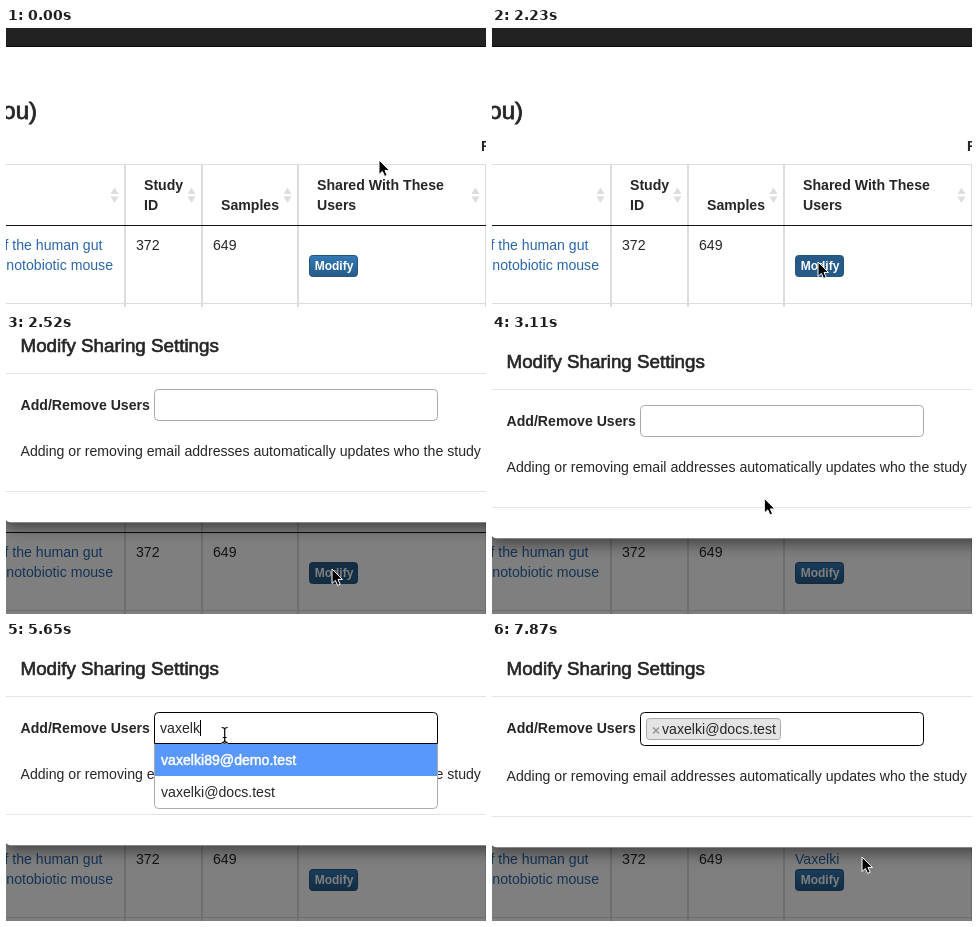
Write an HTML page that moves like this. It is 480 px wide and 279 px high and loops after 8 s.

```html
<!DOCTYPE html>
<html lang="en">
<head>
<meta charset="utf-8">
<title>Sharing settings</title>
<style>
  html, body { margin: 0; width: 100%; height: 100%; overflow: hidden; background: #fff; }
  svg { display: block; width: 100%; height: 100%; }
  text { font: 14.12px "Liberation Sans", Arial, sans-serif; fill: #262626; white-space: pre; }
  .bold { font-weight: bold; }
  .medium { stroke: #262626; stroke-width: .035em; }
  .link { fill: #2a67aa; }
  .end { text-anchor: end; }
  .hint { fill: #909090; }
  .rule { stroke: #ddd; fill: none; }
  .sheet { fill: #fff; stroke: rgba(0, 0, 0, .2); filter: drop-shadow(0 5px 7.5px rgba(0, 0, 0, .5)); }
  .picked { fill: #fff; stroke: #fff; stroke-width: .5px; }
</style>
</head>
<body>
<svg viewBox="0 0 480 279">
  <defs>
    <linearGradient id="blue" x2="0" y2="1">
      <stop stop-color="#337ab7"/><stop offset="1" stop-color="#265a88"/>
    </linearGradient>
  </defs>

  <rect width="480" height="279" fill="#fff"/>
  <rect width="480" height="18" fill="#222"/>
  <rect y="18" width="480" height="1" fill="#080808"/>
  <text class="medium end" x="31" y="91" style="font-size:24px">you)</text>
  <text class="bold" x="475" y="123">F</text>

  <path class="rule" d="M0 136.5H480M0 275.5H480"/>
  <path class="rule" stroke-width="2" d="M119 136V279M196 136V279M292 136V279M480 136V279"/>
  <path d="M0 197.5H480" stroke="#111"/>
  <path id="sorters" fill="#ddd"/>
  <text class="bold" x="138" y="162">Study</text>
  <text class="bold" x="138" y="182">ID</text>
  <text class="bold" x="215" y="182">Samples</text>
  <text class="bold" x="311" y="162">Shared With These</text>
  <text class="bold" x="311" y="182">Users</text>
  <text class="link end" x="96.5" y="222">f the human gut</text>
  <text class="link end" x="107" y="242">notobiotic mouse</text>
  <text x="130" y="222">372</text>
  <text x="207" y="222">649</text>
  <text class="link" id="sharedWith" x="303" y="222"></text>
  <rect id="button" x="303.5" y="227.5" width="48" height="21" rx="3" stroke="#245580"/>
  <text class="bold" x="328" y="242" text-anchor="middle" style="font-size:12px;fill:#fff">Modify</text>

  <rect id="backdrop" width="480" height="279"/>
  <g id="modal">
    <rect id="sheet" class="sheet" x="-1.5" y="-2.5" width="600" rx="6"/>
    <path d="M0 54.5H480" stroke="#e5e5e5"/>
    <text class="medium" x="14.5" y="32.5" style="font-size:18.8px">Modify Sharing Settings</text>
    <text class="bold" x="14.5" y="90.5">Add/Remove Users</text>
    <g id="lower">
      <text x="14.5" y="137">Adding or removing email addresses automatically updates who the study</text>
      <path d="M0 172.5H480" stroke="#e5e5e5"/>
    </g>
    <g id="dropdown">
      <path id="list" fill="#fff" stroke="#aaa"/>
      <path id="highlight" fill="#5897fb"/>
      <text id="row0" x="155" y="123"></text>
      <text id="row1" x="155" y="155"></text>
    </g>
    <path id="field" fill="#fff"/>
    <text id="typed" x="154" y="91"></text>
    <g id="token">
      <rect x="154.5" y="76.5" width="134" height="21" rx="3" fill="#e4e4e4" stroke="#aaa"/>
      <path d="M161 85.5l6 6m0-6l-6 6" stroke="#999" stroke-width="1.7"/>
      <text id="tokenText" x="170" y="91.5"></text>
    </g>
    <rect id="caret" y="78" width="1" height="16"/>
  </g>

  <g id="cursor">
    <path id="arrow" d="M0 0V14.5L3.4 11.4 5.6 16.4 8.2 15.3 6 10.4H10.5Z" stroke="#fff"/>
    <path id="hand" fill="#fff" stroke="#000" stroke-width="1.1" stroke-linejoin="round"
      d="M-1.3 9V.8Q0-1.2 1.4.8V5.2Q3-.0 4 5.6 5.6 4 6.4 6.4 8.6 5.4 8.7 8V11.5L7 16H-.8L-4.6 10.5Q-5 7.6-1.3 10ZM1.4 9.5V13M3.8 9.5V13M6 9.5V13"/>
    <g id="beam" fill="none">
      <path d="M-3-7.5Q0-7.5 0-5.5 0-7.5 3-7.5M0-5.5V5.5M-3 7.5Q0 7.5 0 5.5 0 7.5 3 7.5M-2 2.5H2" stroke="#fff" stroke-width="2.6"/>
      <path d="M-3-7.5Q0-7.5 0-5.5 0-7.5 3-7.5M0-5.5V5.5M-3 7.5Q0 7.5 0 5.5 0 7.5 3 7.5M-2 2.5H2" stroke="#000" stroke-width="1.2"/>
    </g>
  </g>
</svg>

<script>
const LOOP = 8000, TICK = 148.5;   // the screen refreshes once per tick
const NAME = "vaxelki", USERS = [NAME + "89@demo.test", NAME + "@docs.test"];
const KEYS = [26, 27, 28, 30, 32, 35, 39];
const FOCUS = 22, OPEN = 23, PICK = 46, SAVED = 48;

// Pointer glides: first tick, last tick, destination
const START = [373, 132];
const GLIDES = [[2, 8, 326, 234], [18, 22, 218.7, 93], [41, 43, 208.5, 137], [50, 53, 370, 215]];

const $ = id => document.getElementById(id);
const set = (id, attrs) => { for (const k in attrs) $(id).setAttribute(k, attrs[k]); };
const show = (id, on) => { $(id).style.display = on ? "" : "none"; };
const write = (id, text) => { if ($(id).textContent !== text) $(id).textContent = text; };
const clamp = v => Math.min(1, Math.max(0, v));
const within = (v, a, b) => v >= a && v < b;

// Box with separate corner radii for top and bottom
function box(x, y, w, h, top, bottom) {
  return `M${x} ${y + top}q0 ${-top} ${top} ${-top}h${w - 2 * top}q${top} 0 ${top} ${top}` +
    `v${h - top - bottom}q0 ${bottom} ${-bottom} ${bottom}h${2 * bottom - w}q${-bottom} 0 ${-bottom} ${-bottom}Z`;
}

function pointer(tick) {
  let [x, y] = START;
  for (const [from, to, tx, ty] of GLIDES) {
    const p = clamp((tick - from) / (to - from)), e = p * p * (3 - 2 * p);
    x += (tx - x) * e;
    y += (ty - y) * e;
  }
  return [x, y];
}

function drawPointer(tick) {
  const hand = within(tick, 7, 15) || within(tick, 42, PICK);
  const beam = !hand && within(tick, FOCUS, 51);
  show("hand", hand);
  show("beam", beam);
  show("arrow", !hand && !beam);
  set("cursor", { transform: `translate(${pointer(tick)})` });
}

function drawDropdown(tick, count) {
  const results = within(tick, 38, 39) || tick >= 42;
  const picked = results ? (tick >= 43 ? 1 : 0) : -1;
  const missing = 3 - count;
  const hint = missing > 0
    ? `Please enter ${missing} or more character${missing > 1 ? "s" : ""}` : "Searching…";
  show("dropdown", within(tick, OPEN, PICK));
  set("list", { d: box(148.5, 101.5, 283, results ? 65 : 33, 0, results ? 4 : 1) });
  show("highlight", results);
  set("highlight", { d: box(149, 102 + 32 * Math.max(0, picked), 282, 32, 0, picked > 0 ? 4 : 0) });
  write("row0", results ? USERS[0] : hint);
  write("row1", results ? USERS[1] : "");
  set("row0", { class: !results ? "hint" : picked === 0 ? "picked" : "" });
  set("row1", { class: picked === 1 ? "picked" : "" });
}

function drawField(tick) {
  const count = KEYS.filter(k => tick >= k).length;
  const chosen = tick >= PICK, open = within(tick, OPEN, PICK);
  const growth = chosen ? 2 : 0;   // the token makes the field taller
  set("sheet", { height: 206 + growth });
  set("lower", { transform: `translate(0 ${growth})` });
  set("field", {
    d: box(148.5, 70.5, 283, 31 + growth, 4, open ? 0 : 4),
    stroke: tick < FOCUS ? "#aaa" : "#000"
  });
  write("typed", chosen ? "" : NAME.slice(0, count));
  show("token", chosen);
  show("caret", within(tick, FOCUS, 51));
  set("caret", { x: chosen ? 294 : Math.round(154.4 + (count ? $("typed").getComputedTextLength() : 0)) });
  drawDropdown(tick, count);
}

function draw(time) {
  const tick = Math.floor((time % LOOP + 6) / TICK);
  const opening = clamp((tick - 15.92) / 2), fade = clamp(opening * 2);
  set("button", { fill: within(tick, 7, 18) ? "#265a88" : "url(#blue)" });
  write("sharedWith", tick >= SAVED ? NAME[0].toUpperCase() + NAME.slice(1) : "");
  set("backdrop", { opacity: fade / 2 });
  show("modal", fade > 0);
  set("modal", { opacity: fade, transform: `translate(0 ${Math.round(-51 * (1 - opening) ** 1.5)})` });
  drawField(tick);
  drawPointer(tick);
}

set("sorters", { d: [108.5, 185.5, 281.5, 469.5].map(x => `M${x - 4} 166h8l-4-6.5zM${x - 4} 168.5h8l-4 6.5z`).join("") });
write("tokenText", USERS[1]);

const begin = performance.now();
function loop() {
  draw(performance.now() - begin);
  requestAnimationFrame(loop);
}
loop();
</script>
</body>
</html>
```
